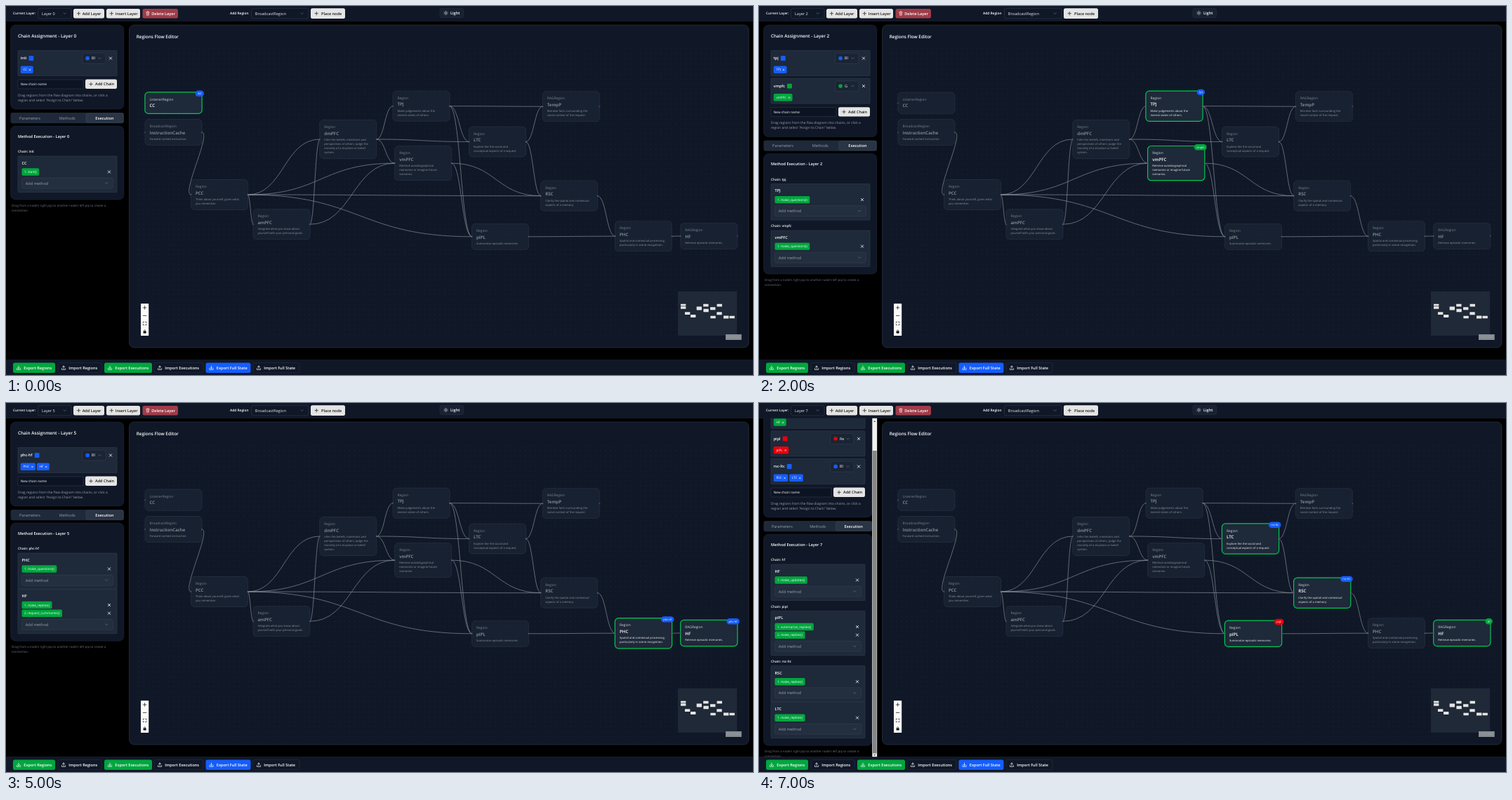
Animation, 1064 px wide and 526 px high, one loop 8000 ms. Source, as an HTML page:

```html
<!DOCTYPE html>
<html lang="en">
<head>
<meta charset="utf-8">
<title>Regions Flow Editor</title>
<style>
html, body { margin: 0; width: 100%; height: 100%; overflow: hidden; background: #000; }
svg { display: block; width: 1064px; height: 526px; font-family: "Open Sans", "Noto Sans", sans-serif; text-rendering: geometricPrecision; }
text { white-space: pre; }
</style>
</head>
<body>
<svg id="stage" viewBox="0 0 1064 526">
  <defs>
    <pattern id="dots" width="7.15" height="7.15" x="188" y="60" patternUnits="userSpaceOnUse">
      <circle cx="1" cy="1" r=".42" fill="#364153"/>
    </pattern>
    <clipPath id="view"><rect y="21.5" width="168.5" height="483"/></clipPath>
  </defs>
  <g id="frame"></g>
  <g id="flow"></g>
  <g id="sidebar" clip-path="url(#view)"></g>
  <g id="picker"></g>
</svg>
<script>
const PANEL = '#101828', CARD = '#1e2939', LINE = '#364153', PALE = '#e5e5e5', INK = '#171717', MUTED = '#99a1af';
const COLORS = { Bl: '#155dfc', G: '#00a63e', Re: '#e7000b' };
const $ = id => document.getElementById(id);
const pen = document.createElement('canvas').getContext('2d');

// Drawing helpers; text is placed by its vertical middle.
const rect = (x, y, w, h, r = 0, fill = PANEL, stroke = 'none', sw = .5) =>
  `<rect x="${x}" y="${y}" width="${w}" height="${h}" rx="${r}" fill="${fill}" stroke="${stroke}" stroke-width="${sw}"/>`;
const text = (x, y, s, size, weight = 400, fill = '#fff', anchor = 'start') =>
  `<text x="${x}" y="${y + size * .36}" font-size="${size}" font-weight="${weight}" fill="${fill}" text-anchor="${anchor}">${s}</text>`;
const path = (d, stroke = '#fff', w = .7) =>
  `<path d="${d}" fill="none" stroke="${stroke}" stroke-width="${w}" stroke-linecap="round" stroke-linejoin="round"/>`;
const textWidth = (s, size, weight) => {
  pen.font = `${weight} 100px "Open Sans", "Noto Sans", sans-serif`;
  return pen.measureText(s).width * size / 100;
};

const plus = (x, y, c) => path(`M${x - 2.3} ${y}h4.6M${x} ${y - 2.3}v4.6`, c);
const cross = (x, y, r = 1.7, w = .8) => path(`M${x - r} ${y - r}l${2 * r} ${2 * r}m0 ${-2 * r}l${-2 * r} ${2 * r}`, '#fff', w);
const chevron = (x, y) => path(`M${x - 1.7} ${y - .8}l1.7 1.7 1.7-1.7`, '#8b93a1', .5);
const transfer = (x, y, up) => path(`M${x - 2.6} ${y + 1}v1.6h5.2v-1.6M${x} ${y - 2.6}v3.8` +
  (up ? `M${x - 1.5} ${y - 1.2}l1.5-1.5 1.5 1.5` : `M${x - 1.5} ${y - .2}l1.5 1.5 1.5-1.5`));
const select = (x, y, w, h, label, fill = PANEL, color = '#e5e7eb') =>
  rect(x, y, w, h, 2.5, fill, LINE) + text(x + 5.3, y + h / 2, label, 5.6, 400, color) + chevron(x + w - 9.3, y + h / 2);

// name: [type, x, y, ...description lines]
const nodes = {
  CC: ['ListenerRegion', 198, 123],
  InstructionCache: ['BroadcastRegion', 198, 161.5, 'Forward cached instruction.'],
  PCC: ['Region', 263.5, 247.5, 'Think about yourself, given what', 'you remember.'],
  amPFC: ['Region', 352, 289.7, 'Integrate what you know about', 'yourself with your personal goals.'],
  dmPFC: ['Region', 446.8, 162.5, 'Infer the beliefs, intentions and', 'perspectives of others. Judge the', 'morality of a situation or belief', 'system.'],
  TPJ: ['Region', 551, 121.2, 'Make judgements about the', 'mental states of others.'],
  vmPFC: ['Region', 553.7, 199.6, 'Retrieve autobiographical', 'memories or imagine future', 'scenarios.'],
  LTC: ['Region', 659.5, 172, 'Explore the the social and', 'conceptual aspects of a request.'],
  pIPL: ['Region', 663.5, 310.3, 'Summarize episodic memories.'],
  TempP: ['RAGRegion', 764.3, 121.7, 'Retrieve facts surrounding the', 'social context of the request.'],
  RSC: ['Region', 761.7, 249.2, 'Clarify the spatial and contextual', 'aspects of a memory.'],
  PHC: ['Region', 867.5, 306.7, 'Spatial and contextual processing,', 'particularly in scene recognition.'],
  HF: ['RAGRegion', 960.8, 309.5, 'Retrieve episodic memories.']
};
const links = {
  InstructionCache: 'PCC', PCC: 'dmPFC vmPFC amPFC RSC pIPL', amPFC: 'dmPFC vmPFC', dmPFC: 'TPJ LTC vmPFC',
  TPJ: 'TempP LTC pIPL', vmPFC: 'RSC pIPL', LTC: 'TempP RSC', RSC: 'PHC', pIPL: 'PHC', PHC: 'HF'
};
const NODE_W = 81, ZOOM = .36;
const nodeHeight = name => 31 + 6 * (nodes[name].length - 3) - (name === 'CC' ? .7 : 0);
const midY = name => nodes[name][2] + nodeHeight(name) / 2;

// Each layer lists chains: [name, color, [region, ...methods], ...]
const layers = [
  [['init', 'Bl', ['CC', 'start']]],
  [['questions_forward', 'Bl', ['PCC', 'make_questions'], ['amPFC', 'make_questions'], ['dmPFC', 'make_questions']]],
  [['tpj', 'Bl', ['TPJ', 'make_questions']], ['vmpfc', 'G', ['vmPFC', 'make_questions']]],
  [['ltc', 'Bl', ['LTC', 'make_questions']], ['pipl', 'G', ['pIPL', 'make_questions']]],
  [['rsc', 'Bl', ['RSC', 'make_questions']], ['tempp', 'G', ['TempP', 'make_replies', 'request_summaries']]],
  [['phc-hf', 'Bl', ['PHC', 'make_questions'], ['HF', 'make_replies', 'request_summaries']]],
  [['phc', 'Bl', ['PHC', 'make_replies']]],
  [['hf', 'G', ['HF', 'make_updates']], ['pipl', 'Re', ['pIPL', 'summarize_replies', 'make_replies']],
   ['rsc-ltc', 'Bl', ['RSC', 'make_replies'], ['LTC', 'make_replies']]]
];

function edge(from, to) {
  const x1 = nodes[from][1] + NODE_W, x2 = nodes[to][1], y1 = midY(from), y2 = midY(to), dx = x2 - x1;
  const bend = dx >= 0 ? dx / 2 : 6.25 * Math.sqrt(-dx * ZOOM);
  return path(`M${x1} ${y1}C${x1 + bend} ${y1} ${x2 - bend} ${y2} ${x2} ${y2}`, '#a6abb5', .55);
}

function node(name, chain) {
  const [type, x, y, ...lines] = nodes[name], h = nodeHeight(name);
  const handle = hx => `<circle cx="${hx}" cy="${y + h / 2}" r="1.2" fill="#6a7282" stroke="#101828" stroke-width=".3"/>`;
  let out = (chain ? rect(x - .1, y - .1, NODE_W + .2, h + .2, 5, CARD, '#00c950', 1.2) : rect(x, y, NODE_W, h, 5, CARD, '#4a5565')) +
    text(x + 6.5, y + 9.8, type, 4.9, 400, '#d1d5dc') + text(x + 6.5, y + 19, name, 6.2, 600) +
    lines.map((s, i) => text(x + 6.5, y + 28.3 + 6 * i, s, 4.1, 500, '#f3f4f6')).join('') +
    handle(x) + (name === 'CC' ? '' : handle(x + NODE_W));
  if (!chain) return `<g opacity=".55">${out}</g>`;
  const w = textWidth(chain[0], 4, 500) + 6.6, left = x + NODE_W + 3 - w;
  return out + rect(left, y - 2.5, w, 8.4, 4.2, COLORS[chain[1]]) + text(left + 3.3, y + 1.6, chain[0], 4, 500);
}

function drawFlow(chains) {
  const owner = {};
  for (const chain of chains) for (const [region] of chain.slice(2)) owner[region] = chain;
  const edges = Object.entries(links).flatMap(([from, to]) => to.split(' ').map(t => edge(from, t)));
  $('flow').innerHTML = edges.join('') + Object.keys(nodes).map(n => node(n, owner[n])).join('');
}

function chainCard(chain, y, right) {
  const [name, colorName, ...regions] = chain, color = COLORS[colorName];
  let tagX = 20.8;
  const tags = regions.map(([region]) => {
    const w = textWidth(region, 4.6, 500), x = tagX;
    tagX += w + 14;
    return rect(x, y + 22, w + 12.2, 10.5, 1.7, color) + text(x + 3.6, y + 27.3, region, 4.6, 500) + cross(x + w + 7.6, y + 27.5, 1, .6);
  });
  return rect(17, y, right - 17, 36, 1, CARD, LINE) + text(20.7, y + 11, name, 5.5, 600) +
    rect(23.8 + textWidth(name, 5.5, 600), y + 7.6, 6.8, 6.8, 1, color) +
    rect(right - 49.5, y + 3.6, 33.5, 15, 2.5, '#1a2434', LINE) + rect(right - 44.6, y + 8.3, 5.4, 5.4, 2, color) +
    text(right - 36, y + 11, colorName, 5.4) + chevron(right - 24.5, y + 11) + cross(right - 9, y + 11) + tags.join('');
}

function regionCard([name, ...methods], y, right) {
  const last = y + 22.5 + 11.7 * (methods.length - 1);
  return rect(17, y, right - 17, last + 29 - y, .8, CARD, LINE) + text(22.5, y + 9.8, name, 5.6, 600) +
    methods.map((method, i) => {
      const label = `${i + 1}. ${method}()`, my = y + 22.5 + 11.7 * i;
      return rect(22.5, my - 5.2, textWidth(label, 4.65, 500) + 6.8, 10.4, 1.7, COLORS.G) + text(25.9, my, label, 4.65, 500) + cross(right - 11, my);
    }).join('') + select(22.5, last + 8.6, right - 28, 15, 'Add method', '#232e3e', MUTED);
}

function drawSidebar(chains, index) {
  const scroll = index === 7 ? 63.2 : 0, right = scroll ? 151 : 158, width = right + 3.5;
  const shift = 39.6 * (chains.length - 1), top = 171 + shift;
  let y = top + 36.5, execution = '';
  for (const [name, , ...regions] of chains) {
    execution += text(17, y, 'Chain: ' + name, 4.7, 600);
    y += 6.5;
    for (const region of regions) {
      execution += regionCard(region, y, right);
      y += 51.5 + 11.7 * (region.length - 2);
    }
    y += 8.5;
  }
  const end = y + 2, tabY = 152 + shift, mid = 6.5 + width / 2, step = width / 3 - .65;
  const body = rect(6.5, 27, width, 120 + shift, 7, PANEL, CARD) +
    text(17, 42.2, `Chain Assignment - Layer ${index}`, 6.4, 600) +
    chains.map((chain, i) => chainCard(chain, 63.5 + 39.6 * i, right)).join('') +
    rect(17, 105 + shift, right - 65, 13, 1, '#0c1322', LINE) + text(20.7, 111.5 + shift, 'New chain name', 4.8) +
    rect(right - 45, 104.6 + shift, 45, 13.4, 2.3, PALE) + plus(right - 37, 111.3 + shift, INK) +
    text(right - 31, 111.3 + shift, 'Add Chain', 5.5, 600, INK) +
    text(17, 127 + shift, 'Drag regions from the flow diagram into chains, or click a', 4.84, 400, MUTED) +
    text(17, 133.9 + shift, 'region and select "Assign to Chain" below.', 4.84, 400, MUTED) +
    rect(6.5, tabY, width, 15.2, 3, CARD) + rect(mid + step / 2, tabY + 1, step, 13.2, 2.5, '#293444', '#3f4a5a') +
    ['Parameters', 'Methods', 'Execution'].map((s, i) =>
      text(mid + step * (i - 1), tabY + 7.6, s, 5.55, i < 2 ? 500 : 600, i < 2 ? MUTED : '#fff', 'middle')).join('') +
    rect(6.5, top, width, end - top, 7, PANEL, CARD) +
    text(17, top + 14.5, `Method Execution - Layer ${index}`, 5.6, 600) + execution +
    text(8, end + 8.5, "Drag from a node's right pip to another node's left pip to create a", 4.45, 400, '#6a7282') +
    text(8, end + 15.5, 'connection.', 4.45, 400, '#6a7282');
  const bar = rect(161.3, 21.5, 7, 483, 0, '#f1f1f1') + rect(162, 68, 5.6, 431.5, 0, '#858585') +
    '<path d="M163.3 27l1.5-2 1.5 2zM163.3 501l1.5 2 1.5-2z" fill="#505050"/>';
  $('sidebar').innerHTML = `<g transform="translate(0 ${-scroll})">${body}</g>` + (scroll ? bar : '');
}

function drawFrame() {
  const button = (x, w, label, fill, color, icon) =>
    rect(x, 4, w, 13.4, 2.5, fill) + text(x + 12.7, 10.7, label, 5.55, 600, color) + icon;
  const footer = [['Export Regions', 10, 60, COLORS.G], ['Import Regions', 74, 62], ['Export Executions', 140, 68, COLORS.G],
    ['Import Executions', 211, 70], ['Export Full State', 284.5, 64, COLORS.Bl], ['Import Full State', 352, 66]];
  const sun = [...Array(8)].map((_, i) => {
    const c = Math.cos(i * Math.PI / 4), s = Math.sin(i * Math.PI / 4);
    return `M${626.5 + 2 * c} ${10 + 2 * s}l${.8 * c} ${.8 * s}`;
  }).join('');
  const scale = .0911;
  const mini = Object.keys(nodes).map(n =>
    rect(961 + (nodes[n][1] - 198) * scale, 424.8 + (nodes[n][2] - 123) * scale, NODE_W * scale, nodeHeight(n) * scale, .3, '#e5e5e5')).join('');
  $('frame').innerHTML =
    rect(0, 0, 1064, 21.5) + rect(0, 21.2, 1064, .5, 0, CARD) +
    text(10, 10.7, 'Current Layer:', 4.7, 600) +
    button(96, 44, 'Add Layer', PALE, INK, plus(103.5, 10.7, INK)) +
    button(143, 48, 'Insert Layer', PALE, INK, plus(150.3, 10.7, INK)) +
    button(194.5, 50.5, 'Delete Layer', '#a03c49', '#fff', path('M199.6 8.9h4.6M200.2 8.9l.3 4.4h2.8l.3-4.4M201 8.7v-1h1.8v1M201.3 10.2v1.8M202.5 10.2v1.8', '#fff', .5)) +
    text(319, 10.7, 'Add Region', 4.85, 600) + select(349.5, 3.3, 81.5, 14.6, 'BroadcastRegion') +
    rect(434, 3.2, 49, 14.8, 2.5, PALE) + plus(442.2, 10.6, INK) + text(449, 10.6, 'Place node', 5.55, 600, INK) +
    rect(618, 3.4, 33.5, 13, 2.5, '#182132', '#2a3546') +
    `<circle cx="626.5" cy="10" r="1.1" fill="none" stroke="#fff" stroke-width=".5"/>` + path(sun, '#fff', .5) +
    text(633, 10, 'Light', 5.6, 600) +
    rect(175.5, 27, 882.5, 460, 7, PANEL, LINE) + text(185.7, 44, 'Regions Flow Editor', 6.4, 600) +
    rect(185.7, 57, 862, 419, 0, 'url(#dots)') +
    rect(192, 424.3, 11.2, 45.8, .5, '#fefefe') + [435.8, 447.2, 458.7].map(y => rect(192, y, 11.2, .4, 0, '#e0e0e0')).join('') +
    plus(197.6, 430, '#000') + path('M195.4 441.4h4.4', '#000') +
    path('M195.3 451.6v-1.4h1.4M198.5 450.2h1.4v1.4M199.9 453.4v1.4h-1.4M196.7 454.8h-1.4v-1.4', '#000', .6) +
    rect(195.6, 463.6, 4, 3, .5, '#000') + path('M196.5 463.6v-.8a1.1 1.1 0 0 1 2.2 0v.8', '#000', .6) +
    rect(957, 406.8, 84.2, 63, 0, '#1f2937') + mini +
    rect(1025, 468, 22.7, 8, 0, '#888c93') + text(1027, 472, 'React Flow', 3.9, 400, '#9b9fa6') +
    rect(0, 504.5, 1064, 21.5) + rect(0, 504.3, 1064, .5, 0, CARD) +
    footer.map(([label, x, w, fill]) => rect(x, 508.5, w, 14.4, 2.5, fill || PANEL, fill ? 'none' : '#2a3546') +
      transfer(x + 8, 515.7, !fill) + text(x + 15.3, 515.7, label, 5.55, 600)).join('');
}

let shown = -1;
function tick() {
  const index = Math.floor(performance.now() / 1000) % layers.length;
  if (index !== shown) {
    shown = index;
    drawFlow(layers[index]);
    drawSidebar(layers[index], index);
    $('picker').innerHTML = select(45.6, 3.3, 47.4, 14.6, `Layer ${index}`);
  }
  requestAnimationFrame(tick);
}
drawFrame();
tick();
</script>
</body>
</html>
```
